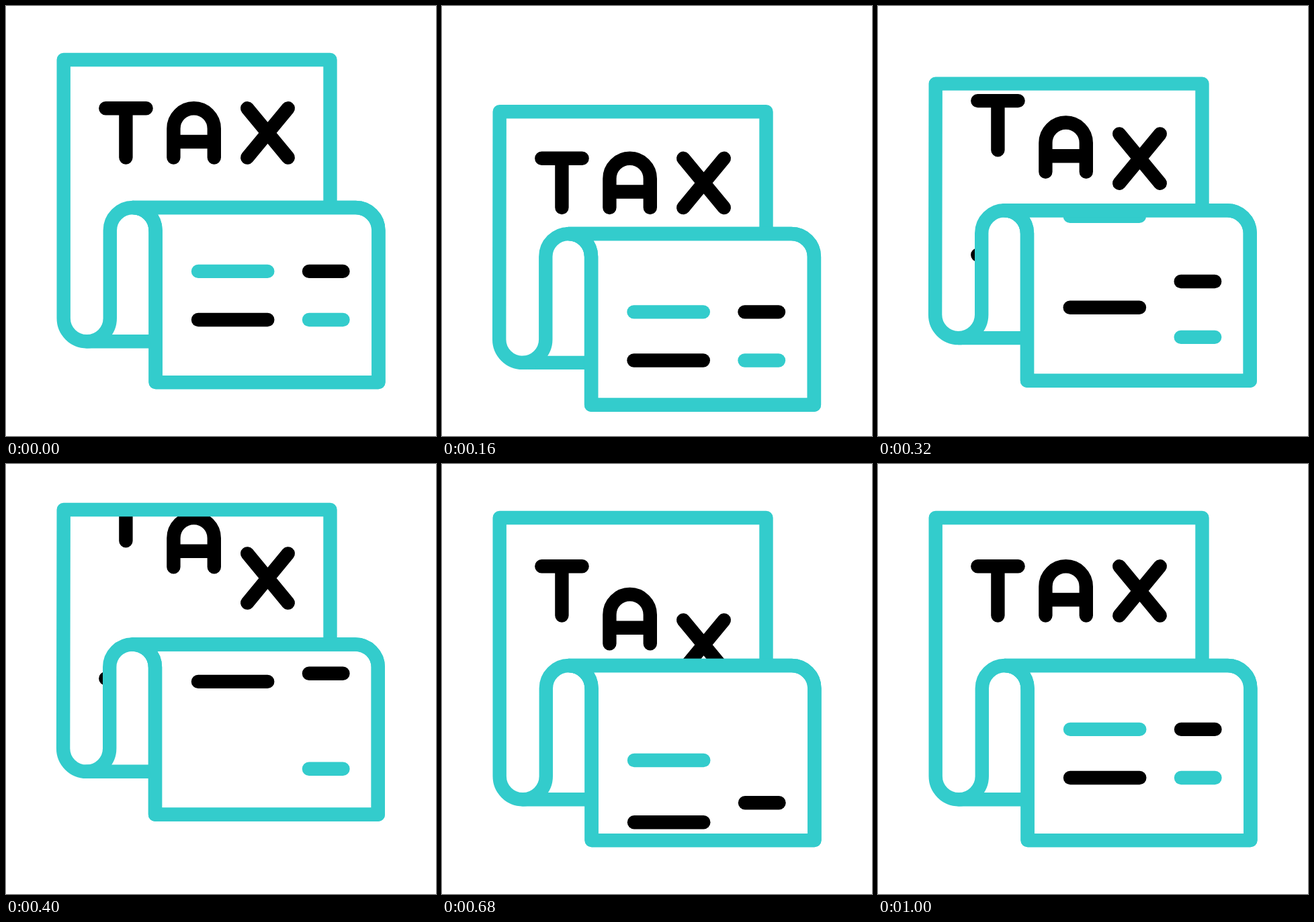
Write an HTML page with a canvas that moves like this. It is 640 px wide and 640 px high and loops after 1.48 s.

```html
<!DOCTYPE html>
<html lang="en">
<head>
<meta charset="utf-8">
<title>Tax bill</title>
<style>
  html, body { margin: 0; height: 100%; overflow: hidden; background: #fff; }
  canvas { display: block; width: 100vw; height: 100vh; }
</style>
</head>
<body>
<canvas id="stage" width="640" height="640"></canvas>
<script>
const ctx = document.getElementById('stage').getContext('2d');
const LOOP = 1480, STEP = 40;
const TEAL = '#33cccc', BLACK = '#000';

const ease = (t, from, to) => {
  const s = Math.min(1, Math.max(0, (t - from) / (to - from)));
  return s * s * (3 - 2 * s);
};

// Paper bounce: rest, pushed down, stretched up, rest.
function bounce(t, down, up) {
  if (t < 200) return down * ease(t, 40, 200);
  if (t < 440) return down + (up - down) * ease(t, 200, 440);
  return up * (1 - ease(t, 440, 640));
}

const LETTERS = [
  { d: 'M148.3 152.3H208.6M178.4 152.3V225.6', out: [200, 520, 156], in: [360, 664, 180] },
  { d: 'M249.4 225.6V182.5A30.2 30.2 0 0 1 309.8 182.5V225.6M249.4 202H309.8',
    out: [255, 573, 156], in: [360, 840, 161] },
  { d: 'M359.2 152.3L419.8 225.6M419.8 152.3L359.2 225.6', out: [340, 660, 156], in: [360, 960, 178] }
];
const BARS = [
  { d: 'M286 394.9H389.3', color: TEAL, out: [200, 374, 140], in: [360, 840, 178] },
  { d: 'M286 467H389.3', color: BLACK, out: [240, 496, 190], in: [440, 840, 188] },
  { d: 'M451 394.9H501.5', color: BLACK, out: [280, 496, 120], in: [480, 958, 176] },
  { d: 'M451 467H501.5', color: TEAL, out: [400, 658, 190], in: [600, 1000, 188] }
];
for (const m of [...LETTERS, ...BARS]) m.path = new Path2D(m.d);

function strokeAt(mark, dx, dy) {
  ctx.save();
  ctx.translate(dx, dy);
  ctx.strokeStyle = mark.color || BLACK;
  ctx.stroke(mark.path);
  ctx.restore();
}

// The old mark slides out at the top while a new one rises from below.
function drawMark(mark, t, dx, base) {
  const [o0, o1, up] = mark.out, [i0, i1, below] = mark.in;
  if (t < o1) strokeAt(mark, dx, base - up * ease(t, o0, o1));
  if (t >= 240) strokeAt(mark, dx, base + below * (1 - ease(t, i0, i1)));
}

function drawMarks(marks, t, dx, base, top, bottom) {
  ctx.save();
  ctx.beginPath();
  ctx.rect(0, top, 640, bottom - top);
  ctx.clip();
  marks.forEach(m => drawMark(m, t, dx, base));
  ctx.restore();
}

function outline(d, fill) {
  const p = new Path2D(d);
  if (fill) {
    ctx.fillStyle = '#fff';
    ctx.fill(p);
  }
  ctx.strokeStyle = TEAL;
  ctx.stroke(p);
}

function draw(t) {
  const top = 80 + bounce(t, 91.5, -20.3);
  const fold = 300 + bounce(t, 46.3, -37.8);
  const curl = 499.3 + bounce(t, 37.4, -47.8);
  const foot = 560.1 + bounce(t, 39.8, -44.6);
  const dx = bounce(t, -0.6, -0.6);

  const x0 = 85.7 + dx, x1 = 154.8 + dx, x2 = 222.6 + dx, x3 = 554.4 + dx;
  const low = curl - 34.5, high = fold + 34;

  ctx.fillStyle = '#fff';
  ctx.fillRect(0, 0, 640, 640);
  ctx.lineWidth = 20.4;
  ctx.lineCap = ctx.lineJoin = 'round';

  drawMarks(LETTERS, t, 0, bounce(t, 88.3, -12), top, curl);

  // Underside of the roll, then the back sheet's edge.
  ctx.fillStyle = '#fff';
  ctx.fill(new Path2D(`M${x1} ${low}V${high}A33.9 34 0 0 1 ${x2} ${high}V${curl}H${x0 + 34.5}A34.5 34.5 0 0 0 ${x1} ${low}Z`));
  outline(`M${x2} ${curl}H${x0 + 34.5}`);
  outline(`M482.5 ${fold}L482.5 ${top}H85.7L${x0} ${low}A34.55 34.5 0 0 0 ${x1} ${low}` +
          `V${high}A33.9 34 0 0 1 ${x2} ${high}`);

  // Front sheet
  const front = `M${x1 + 33.9} ${fold}H${x3 - 34}A34 34 0 0 1 ${x3} ${high}V${foot}H${x2}V${high}` +
                `A33.9 34 0 0 0 ${x1 + 33.9} ${fold}Z`;
  outline(front, true);
  drawMarks(BARS, t, bounce(t, -0.6, 0), bounce(t, 71.7, -20), fold, foot);
  outline(front);
}

const start = performance.now();
function tick() {
  const t = (performance.now() - start) % LOOP;
  draw(Math.floor(t / STEP) * STEP);
  requestAnimationFrame(tick);
}
tick();
</script>
</body>
</html>
```
